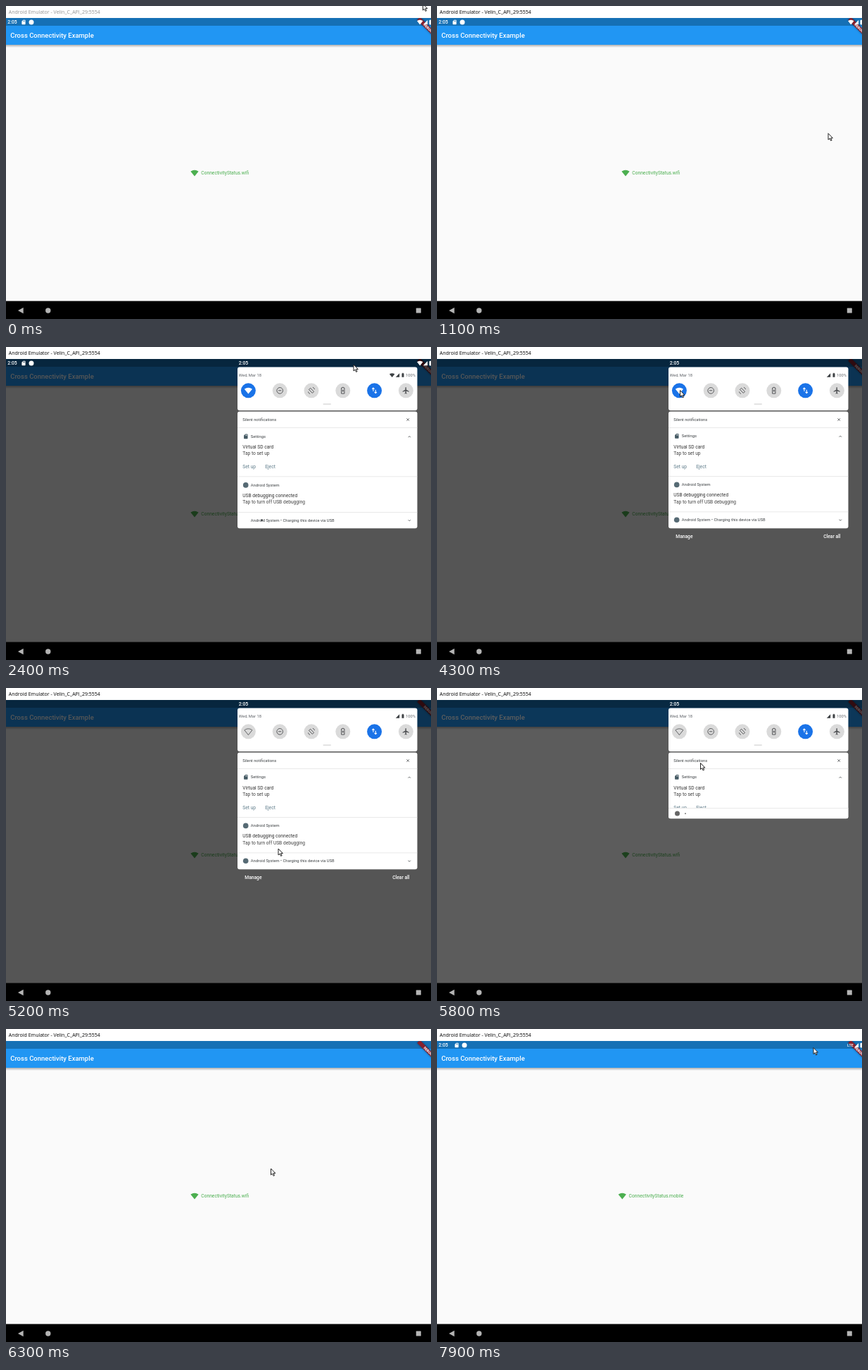
Recreate the animation shown at these times as an HTML page with a canvas. Size 604 px wide and 444 px high, loop 8 s.

```html
<!DOCTYPE html>
<html lang="en">
<head>
<meta charset="utf-8">
<title>Connectivity demo</title>
<style>
html, body { margin: 0; width: 100%; height: 100%; overflow: hidden; background: #fff; }
canvas { display: block; width: 604px; height: 444px; }
</style>
</head>
<body>
<canvas id="stage" width="604" height="444"></canvas>
<script>
const ctx = document.getElementById('stage').getContext('2d');
const LOOP = 8000, STEP = 100;
const BLUE = '#1a73e8', GREY = '#dadada', INK = '#3c4043', SOFT = '#5f6368';

// Icons live in a 24 unit box.
const icons = {
  wifi: new Path2D('M12 21.5L23.64 7c-.45-.34-4.93-4-11.64-4S.81 6.66.36 7z'),
  signal: new Path2D('M2 22h20V2z'),
  battery: new Path2D('M15.67 4H14V2h-4v2H8.33C7.6 4 7 4.6 7 5.33v15.34C7 21.4 7.6 22 8.33 22h7.34c.73 0 1.33-.6 1.33-1.33V5.33C17 4.6 16.4 4 15.67 4z'),
  card: new Path2D('M18 2h-8L4 8v12c0 1.1.9 2 2 2h12c1.1 0 2-.9 2-2V4c0-1.1-.9-2-2-2zM9.5 5v4h2V5zM12.7 5v4h2V5zM16 5v4h2V5z'),
  plane: new Path2D('M21 16v-2l-8-5V3.5c0-.83-.67-1.5-1.5-1.5S10 2.67 10 3.5V9l-8 5v2l8-2.5V19l-2 1.5V22l3.5-1 3.5 1v-1.5L13 19v-5.5l8 2.5z'),
  minus: new Path2D('M12 3a9 9 0 1 0 .01 0M7.5 12h9'),
  rotate: new Path2D('M9 4.5L4.5 9 15 19.5 19.5 15zM16 2.5c3 .8 5 3 5.5 6M8 21.5c-3-.8-5-3-5.5-6'),
  saver: new Path2D('M10 4V2.5h4V4h2.5v17h-9V4zM12 9.5v6M9.7 12.5h4.6'),
  data: new Path2D('M8.5 14V4M5 7.5L8.5 4 12 7.5M15.5 10v10M12 16.5l3.5 3.5 3.5-3.5'),
  cross: new Path2D('M6 6l12 12M18 6L6 18'),
  up: new Path2D('M6 15l6-6 6 6'),
  down: new Path2D('M6 9l6 6 6-6'),
  pointer: new Path2D('M0 0v9l2.1-1.9 1.5 3.3 1.5-.7-1.5-3.1h2.8z')
};

const clamp = v => Math.max(0, Math.min(1, v));
const ramp = (t, a, b) => clamp((t - a) / (b - a));

function track(t, keys) {
  let i = 1;
  while (i < keys.length - 1 && t > keys[i][0]) i++;
  const [t0, ...a] = keys[i - 1], [t1, ...b] = keys[i];
  const k = ramp(t, t0, t1);
  return a.map((v, j) => v + (b[j] - v) * k);
}

const pointerPath = [
  [0, 592.5, -3], [300, 592.5, -3], [600, 583, 90], [900, 558, 226], [1200, 555, 158],
  [1700, 528, 88], [2100, 496, 28], [2200, 494, 25], [2400, 494, 25], [2700, 452, 42],
  [3200, 361, 58], [3400, 345.5, 61.5], [4300, 345.5, 61.5], [4700, 366, 140],
  [5100, 387, 230], [5300, 387, 226], [5800, 374.5, 106.5], [6000, 373, 96],
  [6300, 376.5, 198], [6600, 384, 196], [6900, 406, 184], [7400, 482, 98],
  [7800, 532, 38], [7900, 535, 26.5], [8000, 535, 26.5]
];

function box(x, y, w, h, color, r = 0) {
  ctx.fillStyle = color;
  ctx.beginPath();
  ctx.roundRect(x, y, w, h, r);
  ctx.fill();
}

function disc(x, y, r, color) {
  ctx.fillStyle = color;
  ctx.beginPath();
  ctx.arc(x, y, r, 0, Math.PI * 2);
  ctx.fill();
}

// y is the middle of the lowercase line.
function text(str, x, y, size, color, weight = 400, family = 'Roboto', align = 'left') {
  ctx.font = `${weight} ${size}px ${family}, sans-serif`;
  ctx.textAlign = align;
  ctx.textBaseline = 'alphabetic';
  ctx.fillStyle = color;
  ctx.fillText(str, x, y + size * 0.34);
}

function icon(name, x, y, size, color, line = 0) {
  ctx.save();
  ctx.translate(x - size / 2, y - size / 2);
  ctx.scale(size / 24, size / 24);
  if (line) {
    ctx.lineWidth = line;
    ctx.strokeStyle = color;
    ctx.stroke(icons[name]);
  } else {
    ctx.fillStyle = color;
    ctx.fill(icons[name], 'evenodd');
  }
  ctx.restore();
}

function faded(alpha, draw) {
  ctx.save();
  ctx.globalAlpha *= alpha;
  draw();
  ctx.restore();
}

function clipped(x, y, w, h, r, draw) {
  ctx.save();
  ctx.beginPath();
  ctx.roundRect(x, y, w, h, r);
  ctx.clip();
  draw();
  ctx.restore();
}

function drawBanner() {
  ctx.save();
  ctx.beginPath();
  ctx.rect(0, 17, 604, 401);
  ctx.clip();
  ctx.translate(614, 17);
  ctx.rotate(Math.PI / 4);
  ctx.shadowColor = 'rgba(0,0,0,.5)';
  ctx.shadowBlur = 3;
  box(-19, 17.3, 38, 5.7, '#86202f');
  ctx.shadowColor = 'transparent';
  text('DEBUG', 0, 20.2, 4.8, '#fff', 900, 'Roboto', 'center');
  ctx.restore();
}

function drawApp(t) {
  box(0, 17, 604, 402, '#fafafa');
  const shade = ctx.createLinearGradient(0, 55, 0, 59);
  shade.addColorStop(0, 'rgba(0,0,0,.3)');
  shade.addColorStop(1, 'rgba(0,0,0,0)');
  box(0, 55, 604, 4, shade);
  box(0, 17, 604, 38, '#2196f3');
  box(0, 17, 604, 11, '#1570b5');
  text('Cross Connectivity Example', 6.2, 42, 9.5, '#fff', 500);

  const mobile = t >= 6600;
  icon('wifi', mobile ? 263.3 : 268, 237, 11.4, '#4caf50');
  text('ConnectivityStatus.' + (mobile ? 'mobile' : 'wifi'), mobile ? 272.6 : 277.3, 237, 6.7, '#4caf50');
  drawBanner();
}

function drawStatus(t) {
  const late = t >= 6600;
  if (t < 2500 || late) {
    text('2:05', 2.3, 23, 6.8, '#fff', 500);
    icon('signal', 596, 23, 7.5, '#fff');
    box(601.5, 19.8, 5, 6.8, '#fff', 1);
  }
  if (t < 2500) icon('wifi', 588.3, 23, 8.6, '#fff');
  if (t >= 7000) text('LTE', 583, 23, 5.4, '#fff', 500);
  const arrive = late ? ramp(t, 6900, 7900) : 1;
  if (t < 2500 || t >= 7000) faded(0.2 + 0.8 * arrive, () => {
    const dx = late ? 7 - 4 * arrive : 0;
    icon('card', 25 + dx, 23, 7.8, '#fff');
    disc(36 + dx, 23, 3.5, '#fff');
  });
}

function drawTiles(t, y) {
  const wifiOn = t < 4500;
  const tiles = [
    ['wifi', wifiOn, wifiOn ? 0 : 1.8], ['minus', false, 2], ['rotate', false, 2],
    ['saver', false, 2], ['data', true, 2.3], ['plane', false, 0]
  ];
  tiles.forEach(([name, on, line], i) => {
    const x = 344.4 + i * 44.8;
    disc(x, y, 10.5, on ? BLUE : GREY);
    icon(name, x, y + (name === 'wifi' ? 0.3 : 0), 11.4, on ? '#fff' : '#4d4f52', line);
  });
}

function drawHeader(t, bottom) {
  box(329, 28.5, 255.5, bottom - 28.5, '#fff', 3);
  clipped(329, 28.5, 255.5, bottom - 28.5, 3, () => {
    text('Wed, Mar 18', 330.8, 40, 5.8, SOFT);
    if (t < 3900) icon('wifi', 548.7, 40, 7.6, INK);
    icon('signal', 556.5, 40, 6.4, INK);
    icon('battery', 564, 39.8, 7.2, INK);
    text('100%', 568, 40, 5.8, SOFT);
    drawTiles(t, 61.8);
    box(450.5, 80.3, 11.5, 1.4, GREY, 0.7);
  });
}

function drawNotifications(t, bottom) {
  const shift = t < 2500 ? 0.5 : 0;
  const top = 91.5, height = bottom - top;
  const line = y => box(329, y, 255.5, 0.8, '#e2e2e2');
  box(329, top, 255.5, height, '#fff', 3);
  clipped(329, top, 255.5, height, 3, () => {
    text('Silent notifications', 336.3, 103, 5.8, INK);
    icon('cross', 571.2, 103, 7, INK, 2.6);
    line(114);
    ctx.translate(0, shift);
    icon('card', 340.8, 126.3, 8.2, '#455a64');
    text('Settings', 347.8, 126.5, 5.8, INK);
    icon('up', 573.3, 126.8, 6.5, INK, 3);
    text('Virtual SD card', 336.3, 141.3, 6.65, '#333');
    text('Tap to set up', 336.3, 150.6, 6.65, '#444');
    text('Set up', 336.3, 169.4, 6.7, '#607d8b');
    text('Eject', 368.2, 169.4, 6.7, '#607d8b');
    line(183);
    disc(340.7, 195.4, 3.8, '#566a74');
    text('Android System', 347.8, 195.5, 5.8, INK);
    text('USB debugging connected', 336.3, 210.2, 6.65, '#333');
    text('Tap to turn off USB debugging', 336.3, 219.3, 6.65, '#444');
    line(233.5);
    if (t < 2500) disc(363.5, 245.2, 1.4, INK);
    else disc(340.7, 245.2, 3.8, '#566a74');
    text('Android System • Charging this device via USB', 347.8, 245.3, 5.8, INK);
    icon('down', 573.3, 245.5, 6.5, INK, 3);
    ctx.translate(0, -shift);

    if (bottom < 250) {
      box(329, bottom - 15, 255.5, 15, '#fff');
      line(bottom - 15.3);
      disc(341.5, bottom - 7.2, 3.5, '#666');
      disc(353, bottom - 7.2, 0.9, '#555');
    }
  });
}

function drawShade(t) {
  if (t < 2400 || t >= 6000) return;
  const [scrim] = track(t, [[2400, 0.66], [5600, 0.66], [5800, 0.63], [6000, 0.1]]);
  box(0, 17, 604, 402, `rgba(0,0,0,${scrim})`);
  const [bottom] = track(t, [[2400, 257.3], [5300, 257.3], [5800, 185.3], [6000, 50]]);
  text('2:05', 330.8, 23, 6.8, '#fff', 500);
  drawHeader(t, Math.min(90, bottom));
  if (bottom > 108) drawNotifications(t, bottom);
  faded(ramp(t, 2400, 2700) * (1 - ramp(t, 5200, 5400)), () => {
    text('Manage', 339.3, 269, 6.7, '#fff', 500);
    text('Clear all', 573.5, 269, 6.7, '#fff', 500, 'Roboto', 'right');
  });
}

function drawFrame(t) {
  box(0, 0, 604, 444, '#fff');
  drawApp(t);
  drawShade(t);
  drawStatus(t);

  box(0, 418.5, 604, 26, '#000');
  ctx.fillStyle = '#b4b4b4';
  ctx.beginPath();
  ctx.moveTo(17, 432);
  ctx.lineTo(24.7, 427.8);
  ctx.lineTo(24.7, 436.2);
  ctx.fill();
  disc(59.8, 432, 3.7, '#b4b4b4');
  box(582.8, 428.6, 7, 7, '#b4b4b4', 0.6);

  text('Android Emulator - Velin_C_API_29:5554', 3.8, 8.4, 7.03, t < 900 ? '#929292' : '#000', 400, '"Open Sans"');

  const [x, y] = track(t, pointerPath);
  ctx.save();
  ctx.translate(x, y);
  ctx.lineWidth = 1;
  ctx.strokeStyle = '#222';
  ctx.fillStyle = '#fff';
  ctx.fill(icons.pointer);
  ctx.stroke(icons.pointer);
  ctx.restore();
}

function tick() {
  const t = performance.now() % LOOP;
  drawFrame(Math.floor(t / STEP) * STEP);
  requestAnimationFrame(tick);
}
tick();
</script>
</body>
</html>
```
